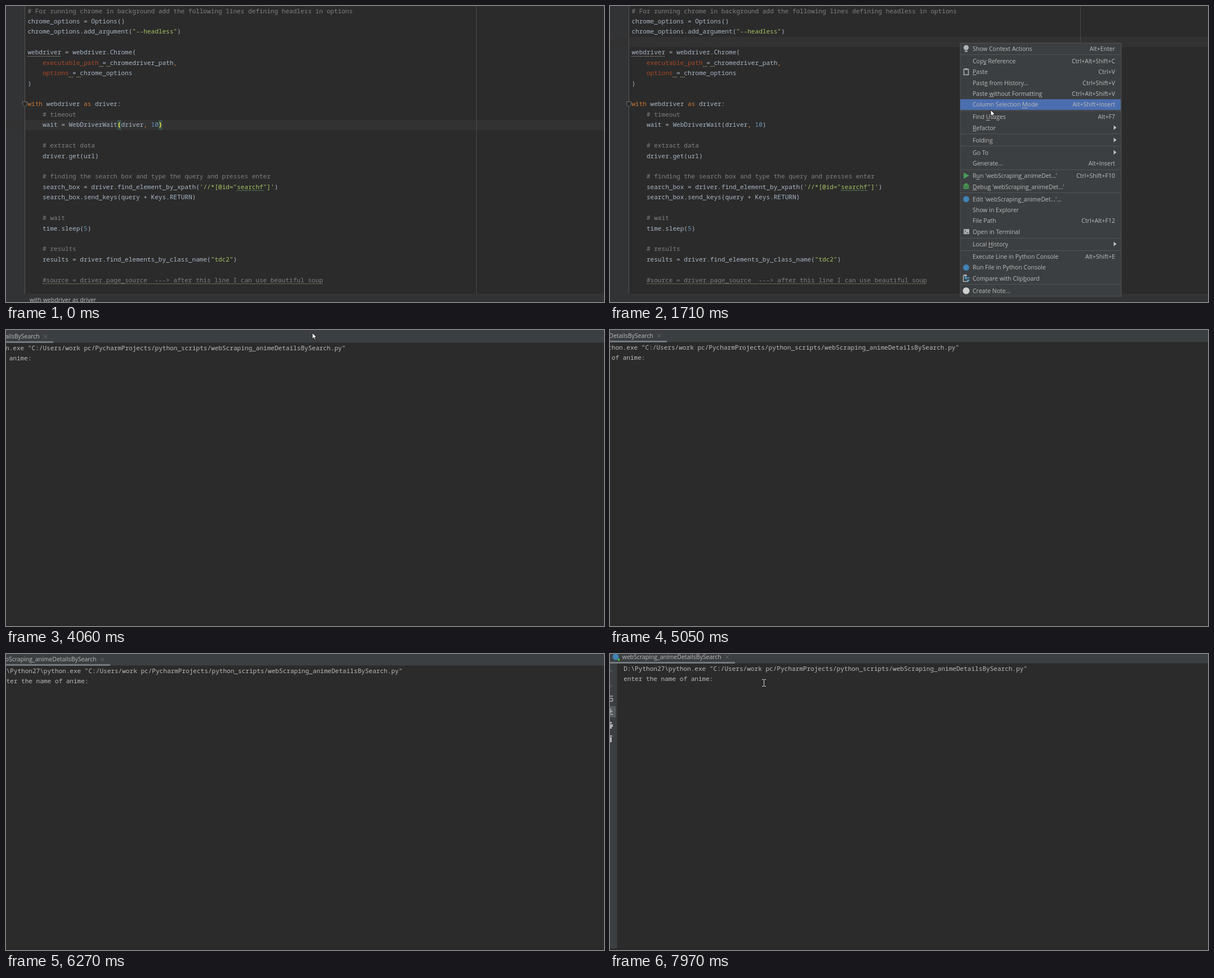
Animation, 1062 px wide and 527 px high, one loop 8 s. Source, as an HTML page with a canvas:

```html
<!DOCTYPE html>
<html lang="en">
<head>
<meta charset="utf-8">
<title>Script run in an editor</title>
<style>
html, body { margin: 0; width: 100%; height: 100%; overflow: hidden; background: #2b2b2b; }
canvas { display: block; }
</style>
</head>
<body>
<canvas id="stage" width="1062" height="527"></canvas>
<script>
const W = 1062, H = 527, LOOP = 8000;
const ctx = document.getElementById('stage').getContext('2d');
const MONO = '11.07px "Noto Sans Mono", "DejaVu Sans Mono", monospace';
const UI = '10.5px "Open Sans", "Noto Sans", sans-serif';
const CELL = 6.64, ROW = 18.43, LEFT = 38.4;

const CODE = `# For running chrome in background add the following lines defining headless in options
chrome_options = Options()
chrome_options.add_argument("--headless")

webdriver = webdriver.Chrome(
    executable_path = chromedriver_path,
    options = chrome_options
)

with webdriver as driver:
    # timeout
    wait = WebDriverWait(driver, 10)

    # extract data
    driver.get(url)

    # finding the search box and type the query and presses enter
    search_box = driver.find_element_by_xpath('//*[@id="searchf"]')
    search_box.send_keys(query + Keys.RETURN)

    # wait
    time.sleep(5)

    # results
    results = driver.find_elements_by_class_name("tdc2")

    #source = driver.page_source  ---> after this line I can use beautiful soup`.split('\n');

// comment, string, keyword, named argument, number, comma, plain
const TOKEN = /(#.*)|("[^"]*"|'[^']*')|\b(with|as)\b|(executable_path|\boptions(?= =))|\b(\d+)\b|(,)|(\w+|[^\w\s]|\s+)/g;
const TINTS = ['#808080', '#a5c261', '#cc7832', '#aa4926', '#6897bb', '#cc7832', '#a9b7c6'];

// row, column, length, colour
const SQUIGGLES = [
  [4, 0, 9, '#8c8c8c'], [5, 19, 1, '#9a9a70'], [5, 21, 1, '#9a9a70'],
  [6, 11, 1, '#9a9a70'], [6, 13, 1, '#9a9a70'], [17, 56, 7, '#659c6b'], [26, 4, 75, '#8a8570']
];

// label (& before the mnemonic), shortcut or '>' for a submenu, icon; '-' is a separator
const MENU = [
  ['Show Context Actions', 'Alt+Enter', 'bulb'], '-',
  ['Cop&y Reference', 'Ctrl+Alt+Shift+C'], ['&Paste', 'Ctrl+V', 'clip'],
  ['Past&e from History...', 'Ctrl+Shift+V'], ['Paste &without Formatting', 'Ctrl+Alt+Shift+V'],
  ['Column Selection &Mode', 'Alt+Shift+Insert'], '-',
  ['Find &Usages', 'Alt+F7'], ['&Refactor', '>'], '-',
  ['Folding', '>'], '-',
  ['Go To', '>'], ['Generate...', 'Alt+Insert'], '-',
  ["R&un 'webScraping_animeDet...'", 'Ctrl+Shift+F10', 'run'],
  ["&Debug 'webScraping_animeDet...'", '', 'bug'], '-',
  ["Edit 'webScraping_animeDet...'...", '', 'blue'], ['Show in Explorer', ''],
  ['File Path', 'Ctrl+Alt+F12'], ['Open in Terminal', '', 'term'], '-',
  ['Local &History', '>'], '-',
  ['Execute Line in Python Console', 'Alt+Shift+E'], ['Run File in Python Console', '', 'blue'],
  ['Compare with Clip&board', '', 'compare'], '-',
  ['Create Note...', '', 'pale']
];

// time, x, y
const POINTER = [
  [70, 958, 533], [300, 810, 340], [600, 584, 92], [810, 621, 67], [930, 621, 67],
  [1200, 640, 95], [1450, 668, 150], [1660, 676, 185], [1740, 676, 185], [2100, 683, 240],
  [2500, 688, 290.5], [2550, 688, 298], [3170, 688, 298], [3300, 689, 305], [3650, 620, 140],
  [3960, 545, 5], [4060, 544, 5], [4240, 536, -15], [7740, 508, -12], [7850, 390, 20], [7970, 273, 51]
];
const PAN = [
  [2920, -138, 6], [4690, -138, 6], [5050, -121, 5], [6270, -37, 4],
  [6780, -12, 0], [7180, -2, 0], [7330, 0, 0]
];

function at(keys, t) {
  const i = keys.findIndex(k => k[0] > t);
  if (i < 0) return keys[keys.length - 1].slice(1);
  if (i === 0) return keys[0].slice(1);
  const a = keys[i - 1], b = keys[i], u = (t - a[0]) / (b[0] - a[0]);
  return [a[1] + (b[1] - a[1]) * u, a[2] + (b[2] - a[2]) * u];
}

function box(x, y, w, h, color) {
  ctx.fillStyle = color;
  ctx.fillRect(x, y, w, h);
}
function dot(x, y, r, color) {
  ctx.fillStyle = color;
  ctx.beginPath();
  ctx.arc(x, y, r, 0, 7);
  ctx.fill();
}
function line(points, color, width = 1) {
  ctx.strokeStyle = color;
  ctx.lineWidth = width;
  ctx.beginPath();
  points.forEach(p => ctx.lineTo(...p));
  ctx.stroke();
}
function poly(points, fill, stroke) {
  ctx.beginPath();
  points.forEach(p => ctx.lineTo(...p));
  ctx.closePath();
  ctx.fillStyle = fill;
  ctx.fill();
  if (stroke) {
    ctx.strokeStyle = stroke;
    ctx.lineWidth = 1;
    ctx.stroke();
  }
}
// Baselines sit on whole pixels to keep the text crisp.
function text(s, x, y, color, font = UI, align = 'left') {
  ctx.font = font;
  ctx.fillStyle = color;
  ctx.textAlign = align;
  ctx.fillText(s, x, Math.round(y));
}

const rowY = i => 9 + ROW * i;
const colX = c => LEFT + CELL * c;

function drawCode() {
  CODE.forEach((src, i) => {
    for (const m of src.matchAll(TOKEN)) {
      const kind = m.slice(1).findIndex(g => g !== undefined);
      text(m[0], colX(m.index), rowY(i) + 3.6, TINTS[kind], MONO);
    }
  });
  for (const [row, col, len, color] of SQUIGGLES) {
    const y = Math.round(rowY(row)) + 6;
    for (let x = 0; x < len * CELL; x += 3) box(Math.round(colX(col)) + x, y, 2, 1, color);
  }
}

function drawEditor(t) {
  const moved = t >= 880;
  box(0, 0, W, H, '#2b2b2b');
  box(0, 0, 33, H, '#313335');
  box(0, Math.round(rowY(moved ? 3 : 11)) - 9, W, 18, '#323232');
  box(33, 0, 1, 512, '#555555');
  box(835, 0, 1, 512, '#4a4a4a');
  if (!moved) for (const c of [24, 35]) box(colX(c), rowY(11) - 9, CELL, 18, '#3b514d');
  drawCode();
  if (!moved) for (const [c, s] of [[24, '('], [35, ')']])
    text(s, colX(c), rowY(11) + 3.6, '#ffef28', 'bold ' + MONO);
  poly([[29.5, 170.5], [37.5, 170.5], [37.5, 176], [33.5, 179.5], [29.5, 176]], '#2b2b2b', '#6b6b6b');
  box(0, 512, W, 15, '#313335');
  if (!moved) text('with webdriver as driver', 42, 527, '#bbbbbb');
  if (moved && (t < 930 || t >= 2700)) box(38, 56, 2, 15, '#bbbbbb');
}

const ICONS = {
  bulb(y) {
    dot(632.5, y - 2, 4.6, '#afb1b3');
    box(630, y + 3, 5, 3, '#8f9193');
  },
  clip(y) {
    ctx.strokeStyle = '#afb1b3';
    ctx.lineWidth = 1.5;
    ctx.strokeRect(628.5, y - 5, 8, 10);
    box(630.5, y - 6.5, 4, 3, '#afb1b3');
  },
  run: y => poly([[628, y - 6], [638, y - .5], [628, y + 5]], '#499c54'),
  bug(y) {
    for (const d of [-3, 0, 3]) line([[627, y + d], [638, y + d]], '#499c54', 1.3);
    dot(632.5, y, 4.2, '#499c54');
    box(630, y - 6, 5, 3, '#499c54');
    box(630.5, y - 1.5, 4, 1, '#3c3f41');
    box(630.5, y + 1, 4, 1, '#3c3f41');
  },
  blue: y => dot(632.5, y, 5.5, '#3f83b5'),
  term(y) {
    box(628, y - 5, 10, 9, '#afb1b3');
    line([[629.5, y - 3], [632, y - 1], [629.5, y + 1]], '#3c3f41');
    box(633, y + 1, 3.5, 1, '#3c3f41');
  },
  compare(y) {
    line([[636, y + 5.5], [627.5, y + 5.5], [627.5, y - 5], [634, y - 5]], '#afb1b3', 1.5);
    box(629, y - 7, 4, 3, '#afb1b3');
    line([[639, y - 1], [632, y - 1]], '#4a9fd0', 1.7);
    poly([[633, y - 4.5], [629, y - 1], [633, y + 2.5]], '#4a9fd0');
    box(634, y + 2, 4, 3, '#4a9fd0');
  },
  pale: y => dot(632.5, y, 6, '#cfcfcf')
};

function drawLabel(label, y) {
  const mark = label.indexOf('&'), plain = label.replace('&', '');
  text(plain, 644, y + 3.7, '#bbbbbb');
  if (mark < 0) return;
  const x = 644 + ctx.measureText(plain.slice(0, mark)).width;
  box(x, Math.round(y) + 5, ctx.measureText(plain[mark]).width, 1, '#aaaaaa');
}

function drawMenu(pointerY) {
  box(621.5, 65.5, 287, 452, '#515151');
  box(622.5, 66.5, 285, 450, '#3c3f41');
  let y = 76;
  for (const item of MENU) {
    if (item === '-') {
      box(622, Math.round(y - 9), 286, 1, '#515355');
      y += 2.62;
      continue;
    }
    const [label, keys, icon] = item;
    if (pointerY > 84 && Math.abs(pointerY - y) < 11)
      box(622, Math.round(y) - 10, 285, 19, '#4b6eaf');
    drawLabel(label, y);
    if (keys === '>') poly([[894.5, y - 4.5], [899.5, y - .5], [894.5, y + 3.5]], '#c0c0c0');
    else text(keys, 897, y + 3.7, '#bbbbbb', UI, 'right');
    if (icon) ICONS[icon](y);
    y += 19.4;
  }
}

function drawToolbar() {
  const grey = '#afb1b3', dim = '#5c5f61';
  box(-40, 17, 53, H, '#3c3f41');
  box(12, 17, 1, H, '#353739');
  line([[-6, 32], [-1, 27], [4, 32]], dim, 1.5);
  line([[-6, 55], [-1, 60], [4, 55]], dim, 1.5);
  line([[-6, 75], [5, 75]], grey, 1.5);
  line([[-6, 79], [4, 79], [5, 81], [4, 84], [0, 84]], grey, 1.5);
  box(-12, 93, 22, 20, '#565b5e');
  line([[-7, 107.5], [5, 107.5]], grey, 1.5);
  line([[1, 97], [1, 104]], grey, 1.5);
  line([[-2, 101], [1, 104], [4, 101]], grey, 1.5);
  box(-5, 121, 8, 3, grey);
  box(-7, 125, 12, 5, grey);
  box(-4, 129, 7, 4, grey);
  box(-6, 145, 10, 2, grey);
  box(-5, 148, 8, 9, grey);
}

function drawConsole(t, dx, dy) {
  box(0, 0, W, H, '#2b2b2b');
  ctx.save();
  ctx.translate(dx, dy);
  box(-10, -10, 1300, 27, '#3c3f41');
  box(-10, 16, 1300, 1, '#323435');
  box(-10, 14, 232, 3, '#747a80');
  drawToolbar();
  dot(10, 5, 5.5, '#3f83b5');
  dot(15.5, 10, 2, '#3fc33f');
  text('webScraping_animeDetailsBySearch', 21.5, 9, '#bbbbbb');
  line([[205, 2.5], [211, 8.5]], '#6e7072');
  line([[211, 2.5], [205, 8.5]], '#6e7072');
  text('D:\\Python27\\python.exe "C:/Users/work pc/PycharmProjects/python_scripts/webScraping_animeDetailsBySearch.py"',
    24.2, 30, '#bbbbbb', MONO);
  if (t >= 3170) text('enter the name of anime: ', 24.2, 48, '#bbbbbb', MONO);
  ctx.restore();
  box(0, 524, W, 3, '#292929');
}

function drawArrow(x, y) {
  const shape = [[0, 0], [0, 11], [2.6, 8.7], [4.4, 12.6], [6.2, 11.8], [4.5, 8], [8, 8]];
  poly(shape.map(p => [p[0] + x, p[1] + y]), '#ffffff', '#111111');
}
function drawBeam(x, y) {
  x = Math.round(x);
  y = Math.round(y);
  box(x, y - 5, 1, 11, '#d8d8d8');
  for (const d of [-6, 6]) {
    box(x - 3, y + d, 3, 1, '#d8d8d8');
    box(x + 1, y + d, 3, 1, '#d8d8d8');
  }
}

function draw(t) {
  const [px, py] = at(POINTER, t);
  const menuOpen = t >= 930 && t < 2700, inConsole = t >= 2920;
  const [dx, dy] = at(PAN, t).map(Math.round);
  if (inConsole) drawConsole(t, dx, dy);
  else drawEditor(t);
  if (menuOpen) drawMenu(py);
  if (t < 70 || (t > 4240 && t < 7740)) return;
  const arrow = menuOpen || (inConsole && py < 17 + dy);
  (arrow ? drawArrow : drawBeam)(px, py);
}

const start = performance.now();
function tick() {
  draw((performance.now() - start) % LOOP);
  requestAnimationFrame(tick);
}
tick();
</script>
</body>
</html>
```
